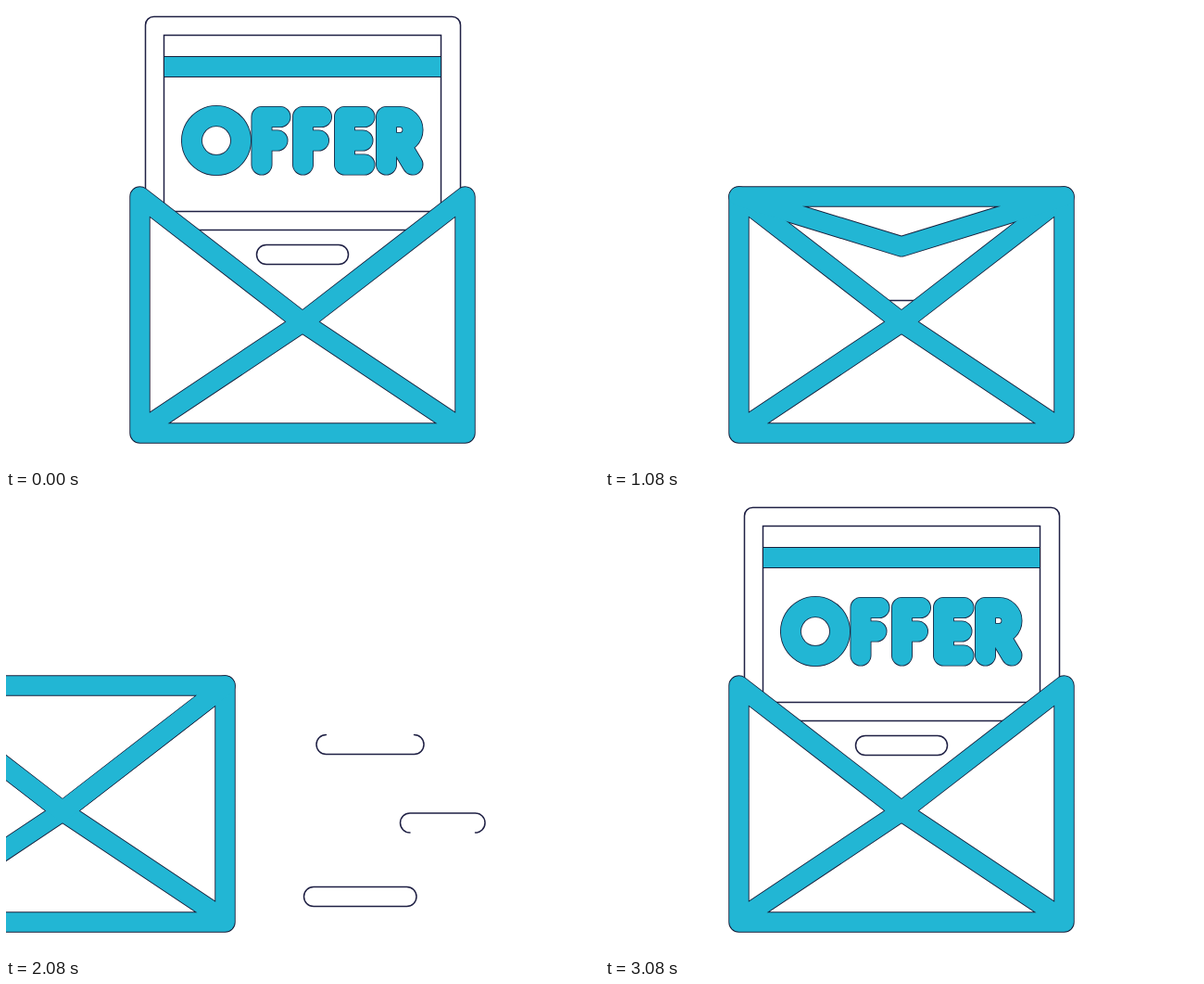
Recreate the animation shown at these times as an HTML page. Size 640 px wide and 497 px high, loop 3.16 s.

```html
<!DOCTYPE html>
<html lang="en">
<head>
<meta charset="utf-8">
<title>Offer envelope</title>
<style>
  html, body { margin: 0; width: 100%; height: 100%; overflow: hidden; background: #fff; }
  svg { display: block; width: 100vw; height: 100vh; }
  path { stroke-linecap: round; stroke-linejoin: round; }
  .edge { stroke: #17203c; fill: none; }
  .body { stroke: #22b6d4; fill: none; }
  .paper { fill: #fff; }
  .line { stroke: #1f2044; stroke-width: 1.5; fill: #fff; }
  .band { stroke: #17203c; stroke-width: 1; fill: #22b6d4; }
</style>
</head>
<body>
<svg viewBox="0 0 640 497" role="img" aria-label="Offer card in an envelope">
  <clipPath id="pocket"><rect x="134" y="0" width="373" height="455"/></clipPath>
  <clipPath id="behindCard"><rect x="151" y="0" width="339" height="455"/></clipPath>
  <g id="streaks"></g>
  <g id="envelope">
    <g id="flapBack" clip-path="url(#behindCard)"></g>
    <g clip-path="url(#pocket)">
      <g id="card">
        <rect class="line" x="150.5" y="11.5" width="340" height="230" rx="9"/>
        <rect class="line" x="170.5" y="31.5" width="299" height="190"/>
        <rect class="band" x="170.5" y="54.5" width="299" height="22"/>
        <rect class="line" x="270.5" y="257.5" width="99" height="21" rx="10.5"/>
        <g id="word"></g>
      </g>
    </g>
    <g id="front"></g>
  </g>
</svg>
<script>
const LOOP = 3160, FPS = 12;
const LEFT = 144.5, RIGHT = 495.5, MID = 320, TOP = 205.5, BOTTOM = 460.5;
const APEX_OPEN = 70.5, APEX_CLOSED = 341;
const $ = id => document.getElementById(id);

function addPath(parent, cls, d = '', width) {
  const path = document.createElementNS('http://www.w3.org/2000/svg', 'path');
  path.setAttribute('class', cls);
  path.setAttribute('d', d);
  if (width) path.setAttribute('stroke-width', width);
  parent.appendChild(path);
  return path;
}

// Lettering: thick rounded strokes with a fine dark edge.
const letterF = x => `M${x} 171V119.5H${x + 20}M${x} 145H${x + 17}`;
const letters = [
  'M227 118.5a26.5 26.5 0 1 1 -.01 0Z',
  letterF(276),
  letterF(320.5),
  'M387 119.5H365.5V171H387M365.5 145H385',
  'M410.5 171V119.5H425a14 14 0 0 1 0 28H412M425 147.5L439 171'
];
for (const d of letters) {
  addPath($('word'), 'edge', d, 23);
  addPath($('word'), 'body', d, 21.3);
}

const frontShape = `M${LEFT} ${TOP}L${MID} ${APEX_CLOSED}L${RIGHT} ${TOP}V${BOTTOM}H${LEFT}Z` +
  `M${LEFT} 458L${MID} ${APEX_CLOSED}L${RIGHT} 458`;
const EDGE = 22.4, BODY = 20.6;
const backFlap = [
  addPath($('flapBack'), 'edge paper', '', EDGE),
  addPath($('flapBack'), 'body', '', BODY)
];
addPath($('front'), 'edge paper', frontShape, EDGE);
const flapEdge = addPath($('front'), 'edge paper', '', EDGE);
addPath($('front'), 'body', frontShape, BODY);
const frontFlap = [flapEdge, addPath($('front'), 'body', '', BODY)];

// Speed streaks: height on stage, [left, right] early and late in the run, open side.
const STREAK_HEIGHT = 21;
const streaks = [
  { y: 258.5, early: [83.5, 137], late: [335, 451], open: 'top' },
  { y: 343, early: [193.5, 239], late: [425.5, 517], open: 'bottom' },
  { y: 422.5, early: [65.5, 121], late: [321.5, 443] }
].map(s => ({ ...s, path: addPath($('streaks'), 'line') }));

const clamp = u => Math.min(1, Math.max(0, u));
const mix = (a, b, u) => a + (b - a) * u;
const smooth = u => (u = clamp(u), u * u * (3 - 2 * u));
const swing = angle => 210.5 * (1 - Math.cos(Math.min(Math.PI, Math.max(0, angle))));

const cardDrop = n => n < 22 ? swing(n * .157) : swing((37.7 - n) * .211);

const flapApex = n => n < 22
  ? mix(APEX_OPEN, APEX_CLOSED, smooth((n - 8) / 7.87))
  : mix(APEX_CLOSED, APEX_OPEN, smooth((n - 26) / 6));

// The envelope speeds off to the right, then coasts in from the left.
function slide(n) {
  if (n <= 15) return 0;
  const out = 7.12 * (n - 15) ** 2;
  return out < 507 ? out : -14.05 * Math.max(0, 31.8 - n) ** 1.52;
}

function streakSpan({ early, late }, n) {
  if (n <= 25) return early.map((x, i) => mix(x, late[i], (n - 20) / 5));
  const u = clamp((n - 25) / 4);
  const end = late[1] + 72;
  return [mix(late[0], end - 22, smooth(u)), mix(late[1], end, u * (2 - u))];
}

function drawStreak(s, n) {
  const [left, right] = streakSpan(s, n);
  const r = STREAK_HEIGHT / 2;
  const visible = n >= 17 && n < 29 && right - left > STREAK_HEIGHT;
  s.path.style.display = visible ? '' : 'none';
  const flip = s.open === 'bottom';
  const from = flip ? s.y + STREAK_HEIGHT : s.y;
  const to = flip ? s.y : s.y + STREAK_HEIGHT;
  const arc = `A${r} ${r} 0 0 ${flip ? 1 : 0}`;
  s.path.setAttribute('d', `M${left + r} ${from}${arc} ${left + r} ${to}` +
    `H${right - r}${arc} ${right - r} ${from}${s.open ? '' : 'Z'}`);
}

function draw(ms) {
  const n = Math.floor((ms % LOOP + 4) * FPS / 1000);
  const apex = flapApex(n);
  const folded = apex > TOP;
  const flap = `M${LEFT} ${TOP}H${RIGHT}L${MID} ${apex}Z`;
  for (const p of [...backFlap, ...frontFlap]) p.setAttribute('d', flap);
  for (const p of backFlap) p.style.display = folded ? 'none' : '';
  for (const p of frontFlap) p.style.display = folded ? '' : 'none';
  $('card').setAttribute('transform', `translate(0 ${Math.round(cardDrop(n))})`);
  $('envelope').setAttribute('transform', `translate(${Math.round(slide(n))} 0)`);
  for (const s of streaks) drawStreak(s, n);
}

const start = performance.now();
function tick() {
  draw(performance.now() - start);
  requestAnimationFrame(tick);
}
tick();
</script>
</body>
</html>
```
